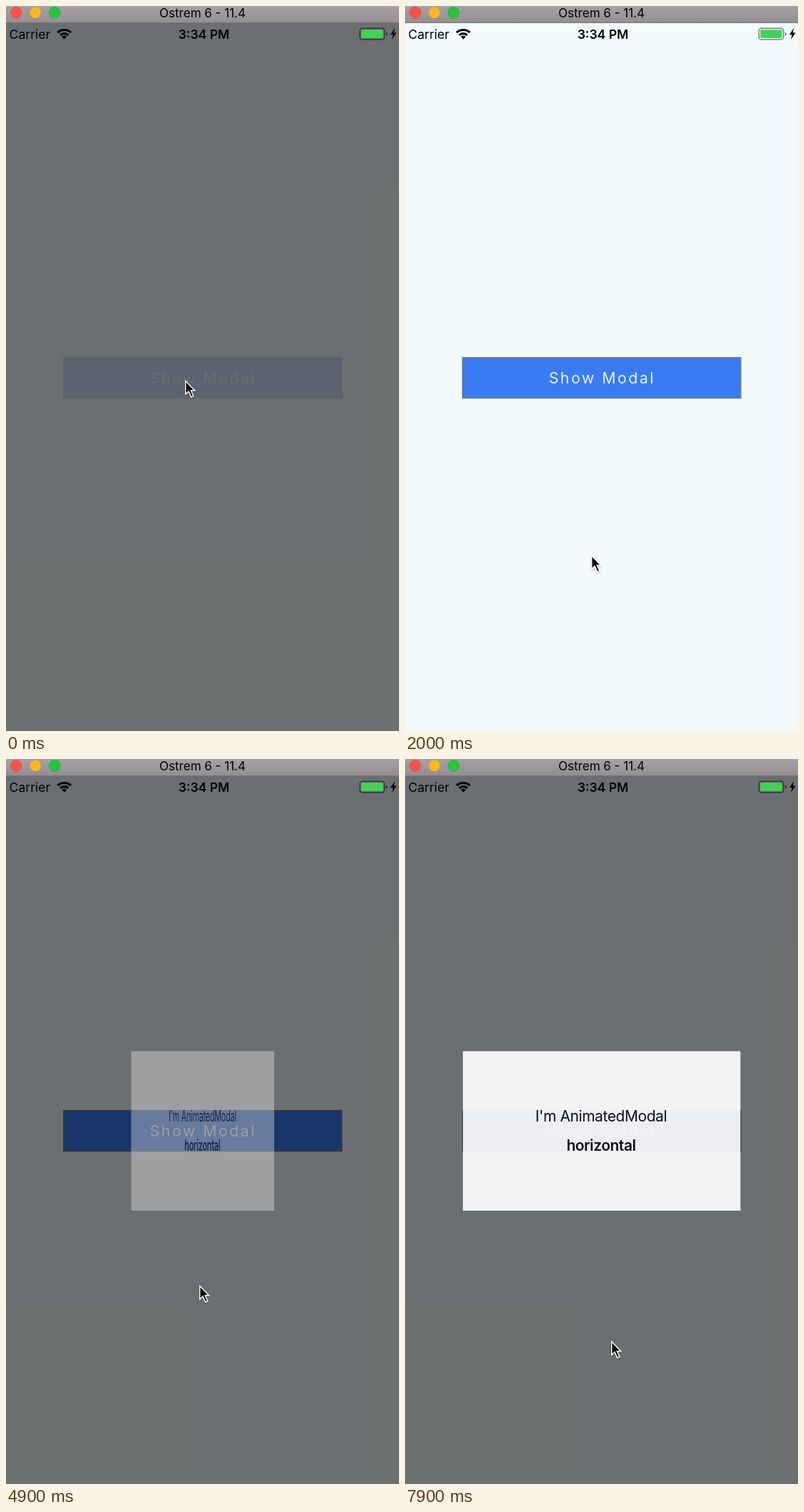
Recreate the animation shown at these times as an HTML page. Size 551 px wide and 1016 px high, loop 8 s.

```html
<!DOCTYPE html>
<html lang="en">
<head>
<meta charset="utf-8">
<title>Animated modal</title>
<style>
  html, body { margin: 0; width: 100%; height: 100%; overflow: hidden; background: #f3fbff; }
  svg { display: block; width: 100%; height: 100%; }
  text { font-family: Inter, Roboto, sans-serif; }
  .mid { text-anchor: middle; }
  .bold { font-weight: 600; }
</style>
</head>
<body>
<svg viewBox="0 0 551 1016">
  <defs>
    <linearGradient id="chrome" x2="0" y2="1">
      <stop offset="0" stop-color="#a5a1a4"/>
      <stop offset="1" stop-color="#928e91"/>
    </linearGradient>
    <filter id="soft" x="-50%" y="-50%" width="200%" height="200%">
      <feDropShadow dx="0" dy="1.2" stdDeviation="1.2" flood-opacity=".35"/>
    </filter>
  </defs>

  <rect width="551" height="1016" fill="#f3fbff"/>
  <g id="button">
    <rect x="80.7" y="492.7" width="390.1" height="56.8" fill="#387bf2" stroke="#78797d" stroke-width="1.5"/>
    <text class="mid" x="276.3" y="529" font-size="21.3" letter-spacing="2.5" fill="#eaf2ff">Show Modal</text>
  </g>

  <rect id="overlay" width="551" height="1016" fill="#000" fill-opacity=".555"/>

  <g id="modal">
    <rect x="80" y="409.5" width="391.5" height="223.5" fill="#fffdff"/>
    <g class="mid" font-size="21" fill="#0d0d10">
      <text x="275" y="508" letter-spacing="-.35">I'm AnimatedModal</text>
      <text class="bold" x="275" y="549" letter-spacing="-.4">horizontal</text>
    </g>
  </g>

  <g id="status" font-size="17.6">
    <text x="4.6" y="46">Carrier</text>
    <g transform="translate(81.7 46.8)">
      <path d="M0 0 L-3.5 -3.7 A5.1 5.1 0 0 1 3.5 -3.7Z"/>
      <path d="M-5.7 -5.9 A8.2 8.2 0 0 1 5.7 -5.9 M-9.3 -9.6 A13.4 13.4 0 0 1 9.3 -9.6" fill="none" stroke="#000" stroke-width="3.1"/>
    </g>
    <text class="mid bold" x="277.5" y="46">3:34 PM</text>
    <rect x="496.2" y="31.2" width="34.4" height="15.8" rx="3.6" fill="none" stroke="#000" stroke-opacity=".5" stroke-width="1.5"/>
    <rect x="498.2" y="33.2" width="30.4" height="11.8" rx="1.8" fill="#43d255"/>
    <path d="M532.8 36.2 Q535 37.2 535 39.2 T532.8 42.2Z" fill-opacity=".5"/>
    <path d="M545.2 30.8 L539 40.2 H542.7 L541 47.2 L547.6 37.6 H543.8Z"/>
  </g>

  <g id="titlebar">
    <rect width="551" height="23.5" fill="url(#chrome)"/>
    <rect y="23" width="551" height="1" fill="#777477"/>
    <g stroke-width=".8">
      <circle cx="14.3" cy="9.3" r="7.9" fill="#fd524c" stroke="#df4843"/>
      <circle cx="41.2" cy="9.3" r="7.9" fill="#fdb724" stroke="#dea034"/>
      <circle cx="68.1" cy="9.3" r="7.9" fill="#28c43d" stroke="#27aa35"/>
    </g>
    <text class="mid" x="275.5" y="15.8" font-size="17">Ostrem 6 - 11.4</text>
  </g>

  <path id="cursor" d="M.7 1.4 V20 L5 15.9 L8.6 24 L11.7 22.7 L8.2 14.8 H13.6Z" fill="#000" stroke="#fff" stroke-width="1.4" filter="url(#soft)"/>
</svg>

<script>
  const LOOP = 8000, STEP = 100, FLIP = 500, FADE = 200;

  // Each showing: button release, overlay on, flip in, flip out (ms)
  const showings = [
    { release: 50, shown: 0, open: 100, close: 1468 },
    { release: 2830, shown: 2850, open: 2900, close: 4600 },
    { release: 6200, shown: 6250, open: 6318, close: 7821 }
  ];

  // Pointer stops: time, x, y
  const stops = [
    [0, 251, 524], [250, 251, 524], [850, 264, 775], [1000, 264, 777],
    [1850, 264, 777], [2000, 261, 769], [2600, 262, 530], [2950, 262, 530],
    [3500, 271, 737], [5250, 271, 737], [5950, 279, 534], [6450, 279, 534],
    [7100, 289, 815], [LOOP, 289, 815]
  ];

  const [button, overlay, modal, cursor] =
    ["button", "overlay", "modal", "cursor"].map(id => document.getElementById(id));

  const clamp = v => Math.min(1, Math.max(0, v));
  const smooth = v => v * v * (3 - 2 * v);
  const easeIn = v => v ** 1.7;
  const easeInOut = v => v < .5 ? easeIn(2 * v) / 2 : 1 - easeIn(2 - 2 * v) / 2;
  const flip = (t, start) => easeInOut(clamp((t - start) / FLIP));

  function pointerAt(t) {
    const i = stops.findIndex(stop => stop[0] > t);
    const [t0, x0, y0] = stops[i - 1], [t1, x1, y1] = stops[i];
    const k = smooth((t - t0) / (t1 - t0));
    return [x0 + (x1 - x0) * k, y0 + (y1 - y0) * k];
  }

  function buttonOpacity(t) {
    const press = showings.find(s => t >= s.release - 100 && t < s.release + FADE);
    return press ? .2 + .8 * clamp((t - press.release) / FADE) : 1;
  }

  function render(t) {
    const current = showings.find(s => t >= s.shown && t < s.close + FLIP);
    const turn = current ? flip(t, current.open) - flip(t, current.close) : 0;
    const width = Math.cos((1 - turn) * Math.PI / 2);

    button.setAttribute("opacity", buttonOpacity(t));
    overlay.setAttribute("visibility", current ? "visible" : "hidden");
    modal.setAttribute("visibility", turn > 0 ? "visible" : "hidden");
    modal.setAttribute("opacity", turn);
    modal.setAttribute("transform", `translate(275.75 0) scale(${width} 1) translate(-275.75 0)`);
    cursor.setAttribute("transform", `translate(${pointerAt(t)})`);
  }

  const start = performance.now();
  function tick() {
    const t = (performance.now() - start) % LOOP;
    render(Math.floor(t / STEP) * STEP);
    requestAnimationFrame(tick);
  }
  tick();
</script>
</body>
</html>
```
